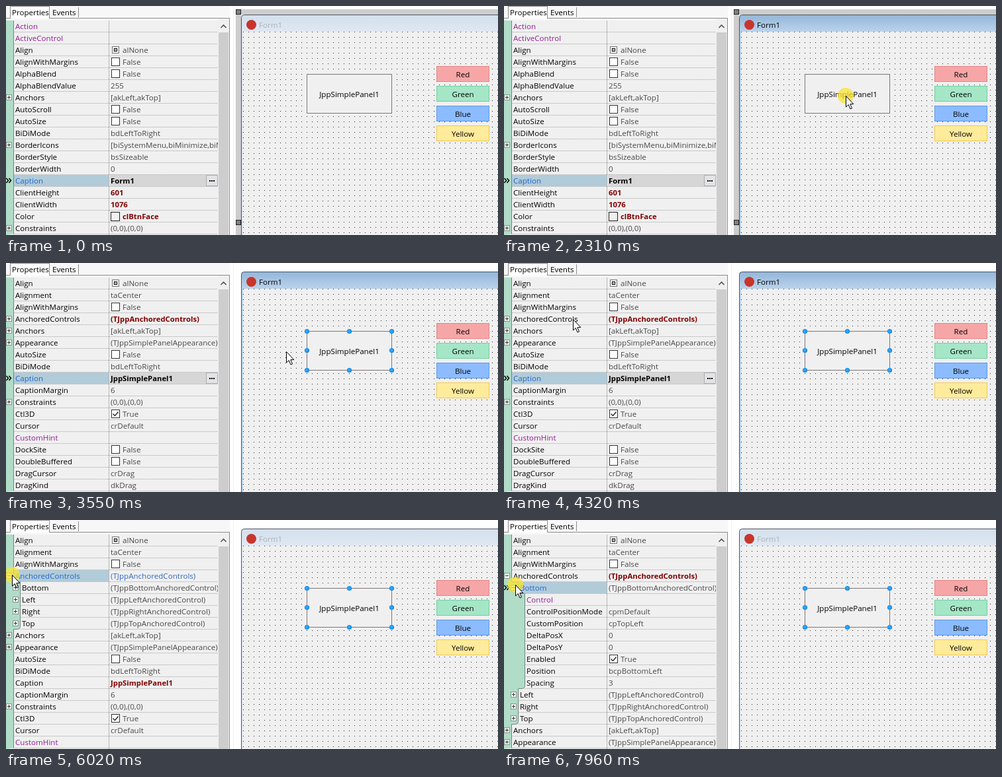
An HTML page with a canvas that plays this animation: 743 by 347 pixels, repeating every 8000 ms.

```html
<!DOCTYPE html>
<html lang="en">
<head>
<meta charset="utf-8">
<title>Property inspector</title>
<style>
html, body { margin: 0; width: 100%; height: 100%; overflow: hidden; background: #fff; }
canvas { display: block; }
</style>
</head>
<body>
<canvas id="stage" width="743" height="347"></canvas>
<script>
const ctx = document.getElementById('stage').getContext('2d');
const W = 743, H = 347, LOOP = 8000;
const FACE = '#f0f0f0', MAROON = '#800000';
const ROW = 18, TOP = 22, SPLIT = 156, LIST_END = 320;
const FORM = { x: 355, y: 13 }, CLIENT = { x: 358, y: 39 }, GRID = 8;
const FAMILY = '"Open Sans", "Noto Sans", sans-serif';
const REGULAR = '11.6px ' + FAMILY, BOLD = 'bold 11.3px ' + FAMILY;

// Row syntax: ">" per level, "+"/"-" expander, "~" reference, "*" changed value
const parse = text => text.trim().split('\n').map(line => {
  const [, depth, mark, name, star, value] = line.match(/^(>*)([+\-~]?)(\w+)=(\*?)(.*)$/);
  return { depth: depth.length, mark, name, changed: !!star, value };
});

const formRows = parse(`
~Action=
~ActiveControl=
Align=alNone
AlignWithMargins=False
AlphaBlend=False
AlphaBlendValue=255
+Anchors=[akLeft,akTop]
AutoScroll=False
AutoSize=False
BiDiMode=bdLeftToRight
+BorderIcons=[biSystemMenu,biMinimize,biMaximize]
BorderStyle=bsSizeable
BorderWidth=0
Caption=*Form1
ClientHeight=*601
ClientWidth=*1076
Color=*clBtnFace
+Constraints=(0,0),(0,0)`);

const panelRows = parse(`
Align=alNone
Alignment=taCenter
AlignWithMargins=False
+AnchoredControls=*(TJppAnchoredControls)
+Anchors=[akLeft,akTop]
+Appearance=(TJppSimplePanelAppearance)
AutoSize=False
BiDiMode=bdLeftToRight
Caption=*JppSimplePanel1
CaptionMargin=6
+Constraints=(0,0),(0,0)
Ctl3D=True
Cursor=crDefault
~CustomHint=
DockSite=False
DoubleBuffered=False
DragCursor=crDrag
DragKind=dkDrag`);

const sideRows = parse(['Bottom', 'Left', 'Right', 'Top']
  .map(s => `>+${s}=(TJpp${s}AnchoredControl)`).join('\n'));

const bottomRows = parse(`
>>~Control=
>>ControlPositionMode=cpmDefault
>>CustomPosition=cpTopLeft
>>DeltaPosX=0
>>DeltaPosY=0
>>Enabled=True
>>Position=bcpBottomLeft
>>Spacing=3`);

function expand(rows, name, children) {
  const i = rows.findIndex(r => r.name === name);
  return [...rows.slice(0, i), { ...rows[i], mark: '-' }, ...children, ...rows.slice(i + 1)].slice(0, 18);
}
const sidesOpen = expand(panelRows, 'AnchoredControls', sideRows);
const bottomOpen = expand(sidesOpen, 'Bottom', bottomRows);

// Pointer moves: start, end, steps, points of a quadratic path, ease-out power
const moves = [
  [610, 1370, 11, [621, 340], [595, 241], [527, 153], 1, true],
  [1450, 1680, 4, [527, 153], [521, 144], [516, 136], 1.3],
  [3470, 4240, 11, [516, 136], [316, 138], [116, 85], 1.32],
  [4320, 5160, 12, [116, 85], [62, 83], [9, 83], 1.32],
  [6800, 6800, 1, [9, 83], [10, 83], [11, 83], 1],
  [6950, 7260, 5, [11, 83], [14, 90], [17, 98], 1.2]
];

function pointer(t) {
  const move = moves.filter(m => t >= m[0]).pop();
  if (!move) return null;
  const [t0, t1, steps, a, b, c, power, appears] = move;
  let u = 1;
  if (t < t1) {
    const done = Math.floor((t - t0) / (t1 - t0) * (steps - 1) + 0.1);
    u = appears ? done / (steps - 1) : (done + 1) / steps;
  }
  const e = 1 - (1 - u) ** power, r = 1 - e;
  return [0, 1].map(k => Math.round(r * r * a[k] + 2 * r * e * b[k] + e * e * c[k]));
}

function rect(x, y, w, h, color) {
  ctx.fillStyle = color;
  ctx.fillRect(x, y, w, h);
}

function frame(x, y, w, h, fill, line) {
  rect(x, y, w, h, line);
  rect(x + 1, y + 1, w - 2, h - 2, fill);
}

function text(s, x, y, color, font = REGULAR, align = 'left') {
  ctx.font = font;
  ctx.fillStyle = color;
  ctx.textAlign = align;
  ctx.fillText(s, x, y);
}

function line(points, color, width = 1) {
  ctx.beginPath();
  points.forEach(([x, y]) => ctx.lineTo(x, y));
  ctx.strokeStyle = color;
  ctx.lineWidth = width;
  ctx.stroke();
}

function disc(x, y, r, color) {
  ctx.beginPath();
  ctx.arc(x, y, r, 0, 7);
  ctx.fillStyle = color;
  ctx.fill();
}

function checker() {
  const tile = document.createElement('canvas');
  tile.width = tile.height = 2;
  const c = tile.getContext('2d');
  c.fillStyle = '#f4f4f4';
  c.fillRect(0, 0, 2, 2);
  c.fillStyle = '#a6a6a6';
  c.fillRect(0, 0, 1, 1);
  c.fillRect(1, 1, 1, 1);
  return ctx.createPattern(tile, 'repeat');
}
const hatch = checker();

function drawTabs() {
  rect(0, 0, 338, 22, '#f7f7f7');
  rect(0, 18, 338, 1, '#8c8c8c');
  frame(6, 0, 60, 19, '#fff', '#8c8c8c');
  rect(7, 18, 58, 1, '#fff');
  rect(109, 2, 1, 15, '#8c8c8c');
  text('Properties', 9, 14, '#000');
  text('Events', 70, 14, '#000');
}

const edge = depth => 11 + 10 * depth;

function drawGutter(rows) {
  const outline = () => {
    ctx.beginPath();
    ctx.moveTo(edge(0) + 0.5, TOP);
    rows.forEach((row, i) => {
      const next = (rows[i + 1] || row).depth;
      const x = edge(row.depth) + 0.5, nx = edge(next) + 0.5, y = TOP + ROW * (i + 1) - 0.5;
      if (next < row.depth) {
        ctx.lineTo(x, y - 4);
        ctx.quadraticCurveTo(x, y, x - 4, y);
      } else ctx.lineTo(x, y);
      ctx.lineTo(nx, y);
    });
  };
  outline();
  ctx.lineTo(0, H);
  ctx.lineTo(0, TOP);
  ctx.fillStyle = '#b0dcc8';
  ctx.fill();
  outline();
  ctx.strokeStyle = '#71877d';
  ctx.lineWidth = 1;
  ctx.stroke();
}

function drawExpander(x, y, open) {
  frame(x - 4, y - 4, 9, 9, '#f8f8f8', '#85958d');
  rect(x - 2, y, 5, 1, '#333');
  if (!open) rect(x, y - 2, 1, 5, '#333');
}

// Small picture before a value; returns where the value text begins
function drawGlyph(row, cy) {
  const y = cy - 6, v = row.value;
  if (v === 'False' || v === 'True') {
    frame(159, y, 13, 13, '#fff', '#333');
    if (v === 'True') line([[161.5, cy + 0.5], [164.5, cy + 3.5], [169.5, cy - 2.5]], '#222', 1.3);
  } else if (row.name === 'Align') {
    ctx.setLineDash([1, 1]);
    ctx.strokeStyle = '#000';
    ctx.lineWidth = 1;
    ctx.strokeRect(160.5, y + 1.5, 10, 10);
    ctx.setLineDash([]);
    frame(163, cy - 2, 5, 5, '#fff', '#000');
    rect(165, cy, 1, 1, '#000');
  } else if (row.name === 'Color') {
    frame(158, y, 14, 14, FACE, '#222');
  } else return 158;
  return 176;
}

// stage: 0 just clicked, 1 marked, 2 value cell in edit
function drawList(rows, selected, stage) {
  rect(0, TOP - 3, LIST_END, H, FACE);
  drawGutter(rows);
  rows.forEach((row, i) => {
    const y = TOP + ROW * i, cy = y + 8, x0 = edge(row.depth) + 1;
    const active = row.name === selected;
    if (active) {
      rect(x0, y, SPLIT - x0, ROW - 1, '#b1cbd9');
      if (stage === 2) rect(SPLIT + 1, y, LIST_END - SPLIT - 1, ROW - 1, '#d6d6d6');
    }
    ctx.setLineDash([1, 1]);
    line([[x0, y + ROW - 0.5], [LIST_END, y + ROW - 0.5]], '#a2a2a2');
    ctx.setLineDash([]);
    if (row.mark === '+' || row.mark === '-') drawExpander(4 + 10 * row.depth, cy, row.mark === '-');
    text(row.name, x0 + 2, y + 13, active ? '#2468cc' : row.mark === '~' ? '#921d92' : '#000');

    let color = row.changed ? MAROON : '#484848';
    if (active && stage === 0) color = '#3568c4';
    if (active && stage === 2) color = '#000';
    const bold = row.changed && !(active && stage === 0);
    ctx.save();
    ctx.beginPath();
    ctx.rect(SPLIT, y, LIST_END - SPLIT, ROW);
    ctx.clip();
    text(row.value, drawGlyph(row, cy), y + 13, color, bold ? BOLD : REGULAR);
    ctx.restore();

    if (active && row.name === 'Caption') {
      frame(302, y, 18, ROW - 1, '#e3e3e6', '#adadad');
      for (let k = 0; k < 3; k++) rect(307 + 3 * k, cy, 2, 2, '#000');
    }
    if (active && stage > 0) {
      for (const x of [0.5, 4.5]) line([[x, cy - 3], [x + 3, cy + 0.5], [x, cy + 4]], '#000', 1.5);
    }
  });
  rect(SPLIT - 1, TOP, 1, H, '#b8b8b8');
}

function drawScrollbar() {
  rect(LIST_END, 19, 17, H, FACE);
  line([[324.5, 33], [328.5, 29], [332.5, 33]], '#555', 1.7);
  rect(LIST_END + 1, 40, 15, H, '#cdcdcd');
  rect(337, 19, 1, H, '#8c8c8c');
  rect(338, 0, W, H, '#fff');
  rect(343, 0, 1, H, FACE);
}

function drawForm(active, framed) {
  const { x, y } = FORM;
  if (framed) {
    rect(x - 8, y - 8, W, 8, hatch);
    rect(x - 8, y - 8, 8, H, hatch);
    for (const top of [y - 8, 324]) frame(x - 8, top, 8, 8, '#808080', '#222');
  }
  ctx.beginPath();
  ctx.roundRect(x + 0.5, y + 0.5, W, H, 4);
  const bar = ctx.createLinearGradient(0, y, 0, CLIENT.y);
  bar.addColorStop(0, active ? '#93b5d8' : '#d3dfec');
  bar.addColorStop(1, active ? '#bad3ec' : '#dfe8f2');
  ctx.fillStyle = bar;
  ctx.fill();
  ctx.strokeStyle = '#4b5663';
  ctx.lineWidth = 1;
  ctx.stroke();
  rect(CLIENT.x, CLIENT.y, W, H, FACE);
  disc(370.5, 28.5, 7.5, '#c8352b');
  text('Form1', 382, 33, active ? '#000' : '#aab3bc');
  for (let dy = CLIENT.y; dy < H; dy += GRID)
    for (let dx = CLIENT.x; dx < W; dx += GRID) rect(dx, dy, 1, 1, '#222');
}

function drawPanel(handles) {
  frame(454, 103, 129, 60, FACE, '#7d757b');
  for (const x of [454, 518, 582]) for (const y of [103, 132, 162]) {
    if (x === 518 && y === 132) continue;
    if (handles === 'erased') rect(x - 3, y - 3, 7, 7, FACE);
    if (handles === 'shown') {
      disc(x + 0.5, y + 0.5, 3.6, '#1586dc');
      disc(x + 0.2, y + 0.2, 2.5, '#2ba4fb');
    }
  }
  text('JppSimplePanel1', 518.5, 138, '#000', REGULAR, 'center');
}

const buttons = [
  ['Red', '#f6a6a6', '#e58484'],
  ['Green', '#a5e6c7', '#70cfa0'],
  ['Blue', '#8cbcff', '#5b98ec'],
  ['Yellow', '#ffeb9c', '#f0c94e']
];

function drawButtons() {
  buttons.forEach(([label, fill, border], i) => {
    const y = 91 + 30 * i;
    frame(650, y, 80, 24, fill, border);
    text(label, 690, y + 17, '#000', REGULAR, 'center');
  });
}

function drawPointer([x, y], clicking) {
  if (clicking) disc(x, y, 12, 'rgba(250, 228, 50, 0.76)');
  const shape = [[0, 0], [0, 16.5], [3.8, 13], [6.5, 19.5], [9, 18.5], [6.3, 12.2], [11.3, 12]];
  ctx.beginPath();
  shape.forEach(([dx, dy]) => ctx.lineTo(x + dx + 0.5, y + dy + 0.5));
  ctx.closePath();
  ctx.fillStyle = '#fff';
  ctx.fill();
  ctx.strokeStyle = '#000';
  ctx.lineWidth = 1;
  ctx.stroke();
}

function listState(t) {
  if (t < 2380) return [formRows, 'Caption', 2];
  if (t < 6020) return [panelRows, 'Caption', 2];
  if (t < 7870) return [sidesOpen, 'AnchoredControls', t < 6095 ? 0 : t < 6170 ? 1 : 2];
  return [bottomOpen, 'Bottom', t < 7960 ? 0 : 1];
}

function draw(t) {
  const within = (a, b) => t >= a && t < b;
  drawList(...listState(t));
  drawTabs();
  drawScrollbar();
  drawForm(within(2310, 6020), t < 2460);
  drawPanel(t < 2380 ? 'none' : t < 2460 ? 'erased' : 'shown');
  drawButtons();
  const at = pointer(t);
  if (at) drawPointer(at, within(2310, 2460) || within(6020, 6170) || t >= 7870);
}

const start = performance.now();
function tick() {
  draw((performance.now() - start) % LOOP);
  requestAnimationFrame(tick);
}
tick();
</script>
</body>
</html>
```
